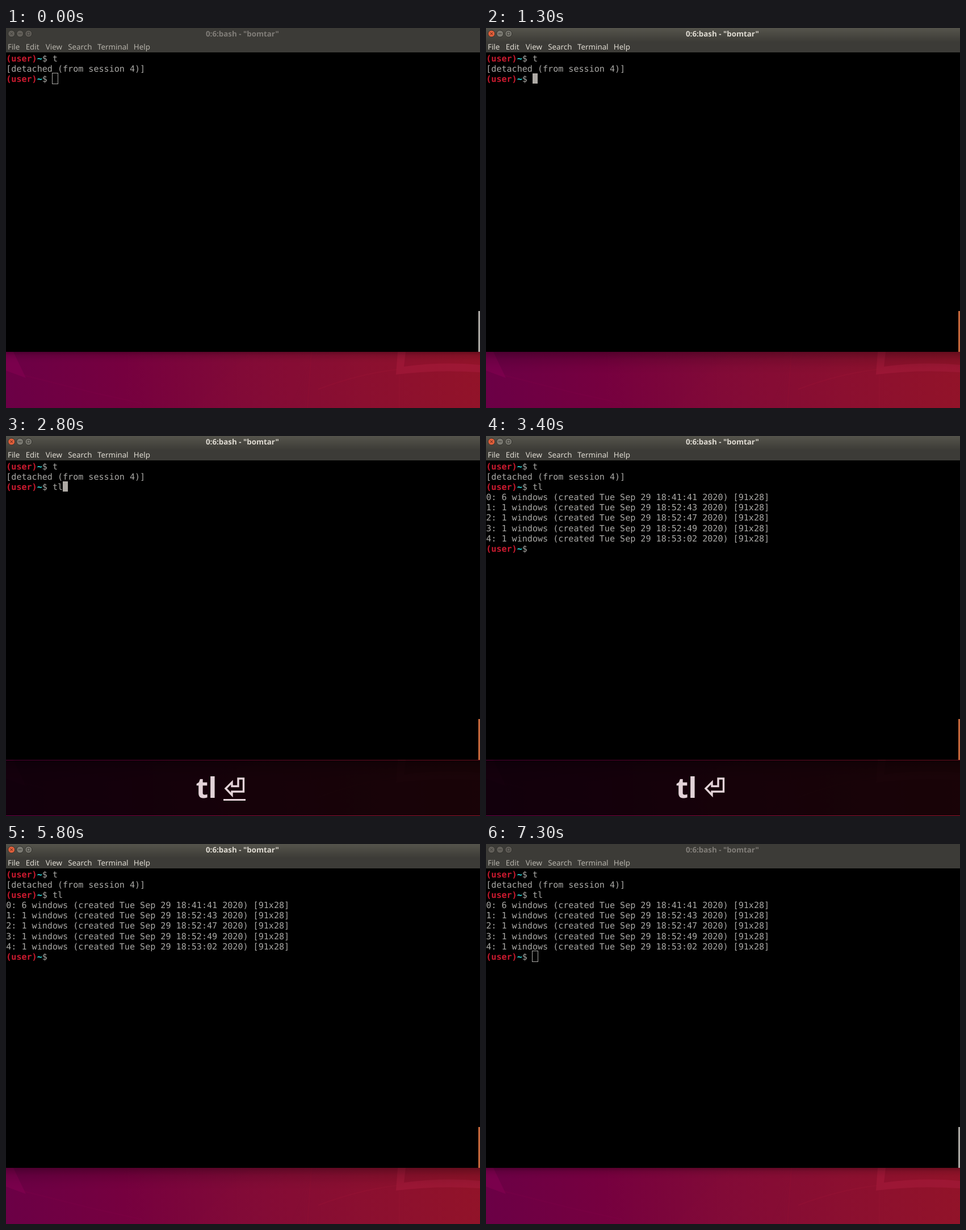
An HTML page with a canvas that plays this animation: 835x670 px, repeating every 7.4 s.

```html
<!DOCTYPE html>
<html lang="en">
<head>
<meta charset="utf-8">
<title>Terminal session</title>
<style>
html, body { margin: 0; width: 100%; height: 100%; overflow: hidden; background: #000; }
canvas { display: block; }
</style>
</head>
<body>
<canvas id="stage" width="835" height="670"></canvas>
<script>
const ctx = document.getElementById('stage').getContext('2d');
ctx.textRendering = 'geometricPrecision';
const W = 835, H = 670, DESK = 571, LOOP = 7400;
const LEFT = .25, CELL = 9.07, ROW = 18.15, BASELINE = 58.6;
const MONO = '15.1px "DejaVu Sans Mono", monospace';
const UI = '13.33px "Noto Sans", sans-serif';
const GREY = '#aaa9a6';

const MENU = [['File', 3], ['Edit', 34.7], ['View', 69.7], ['Search', 109.2], ['Terminal', 161], ['Help', 224.8]];
const SESSIONS = ['6 18:41:41', '1 18:52:43', '1 18:52:47', '1 18:52:49', '1 18:53:02'].map((s, i) => {
  const [count, time] = s.split(' ');
  return `${i}: ${count} windows (created Tue Sep 29 ${time} 2020) [91x28]`;
});
// The cursor flips at each of these times, starting visible.
const BLINKS = [900, 1300, 2300, 2800, 3400, 4300, 4700, 5200, 5800, 6500, 7000, 7300];

function rect(x, y, w, h, fill) {
  ctx.fillStyle = fill;
  ctx.fillRect(x, y, w, h);
}

function text(s, x, y, font, fill) {
  ctx.font = font;
  ctx.fillStyle = fill;
  ctx.fillText(s, x, y);
}

function gradient(x0, y0, x1, y1, ...colors) {
  const g = ctx.createLinearGradient(x0, y0, x1, y1);
  colors.forEach((c, i) => g.addColorStop(i / (colors.length - 1), c));
  return g;
}

function shape(d, fill, stroke, width = 1) {
  const path = new Path2D(d);
  if (fill) { ctx.fillStyle = fill; ctx.fill(path); }
  if (stroke) { ctx.strokeStyle = stroke; ctx.lineWidth = width; ctx.stroke(path); }
}

// Text on the character grid
function put(s, col, row, fill = GREY, bold = false) {
  [...s].forEach((c, i) => {
    if (c !== ' ') text(c, LEFT + (col + i) * CELL, Math.round(BASELINE + row * ROW), (bold ? 'bold ' : '') + MONO, fill);
  });
}

function prompt(row, command) {
  put('(user)', 0, row, '#cb1a2f', true);
  put('~', 6, row, '#34e2e2', true);
  put('$ ' + command, 7, row);
}

function wallpaper() {
  rect(0, DESK, W, H - DESK, gradient(0, 660, W, 600, '#6b0046', '#76003f', '#810a37', '#8b0f30', '#921329'));
  shape('M0 571H13L35 617L0 604Z', '#85005290');
  shape('M30 612L150 642L240 662', null, '#85004838', 2);
  shape('M330 670L430 571H545L500 670Z', '#8d0c3818');
  shape('M538 571L531 670M693 612V670', null, '#a0183828', 2);
  shape('M550 637Q620 610 690 602', null, '#a3183a38', 2);
  shape('M690 571H704L701 597Q770 588 835 594V607Q760 602 687 611Z', '#a41a3aa0');
}

function shadow(depth, strength) {
  rect(0, DESK, W, depth, gradient(0, DESK, 0, DESK + depth,
    `rgba(0,0,0,${strength})`, `rgba(0,0,0,${strength * .36})`, `rgba(0,0,0,${strength * .1})`, 'rgba(0,0,0,0)'));
}

function button(x, fill, icon, ink) {
  ctx.beginPath();
  ctx.arc(x, 10, 6, 0, 7);
  ctx.fillStyle = fill;
  ctx.fill();
  ctx.strokeStyle = '#302f2b';
  ctx.lineWidth = 1;
  ctx.stroke();
  ctx.save();
  ctx.translate(x, 10);
  shape(icon, null, ink);
  ctx.restore();
}

function chrome(focused) {
  shadow(focused ? 40 : 20, focused ? .3 : .28);
  rect(0, 0, W, 43, '#3c3b37');
  if (focused) rect(0, 0, W, 24, gradient(0, 0, 0, 24, '#55544c', '#3d3c37'));
  const plain = focused ? '#7b7a72' : '#625f59', ink = focused ? '#3a3934' : '#3c3b37';
  button(9.7, focused ? '#e2603b' : plain, 'M-2.3 -2.3L2.3 2.3M2.3 -2.3L-2.3 2.3', focused ? '#5c2417' : ink);
  button(24.7, plain, 'M-3 0H3', ink);
  button(39.7, plain, 'M-2.3 -2.3H2.3V2.3H-2.3Z', ink);
  text('0:6:bash - "bomtar"', 352, 15, 'bold ' + UI, focused ? '#dfdbd2' : '#807d78');
  for (const [label, x] of MENU) text(label, x, 38, UI, focused ? '#dfdbd2' : '#b5b2aa');
  rect(832, 499, 3, 72, focused ? '#c5673b' : '#a9a7a2');
}

function keyOverlay(t) {
  const ink = '#e3d3d8', font = 'bold 50px "Noto Sans", sans-serif';
  const underline = (x, w) => rect(x, 640, w, 3, ink);
  rect(0, 572, W, 97, 'rgba(0,0,0,.83)');
  if (t < 1800) {
    text('t', 368, 638, font, ink);
    if (t < 1700) underline(368, 22);
  } else if (t < 2800) {
    text('tl', 360, 638, font, ink);
    if (t < 1900) underline(382, 15);
  } else {
    text('tl', 334.5, 638, font, ink);
    shape('M387 621.5L398 610.5V617.5H409V604H418.5V627H398V633Z', null, ink, 3.4);
    if (t < 3200) underline(383, 39);
  }
}

function draw(t) {
  const focus = t < 300 || t >= 7300 ? 0 : t < 400 ? .5 : 1;
  const listed = t >= 3000;
  const command = t < 1500 ? '' : t < 1700 ? 't' : 'tl';

  wallpaper();
  if (focus < 1) chrome(false);
  ctx.globalAlpha = focus;
  if (focus) chrome(true);
  ctx.globalAlpha = 1;

  rect(0, 43, 832, DESK - 43, '#000');
  rect(832, 43, 3, 456, '#000');
  prompt(0, 't');
  put('[detached (from session 4)]', 0, 1);
  prompt(2, command);
  if (listed) {
    SESSIONS.forEach((line, i) => put(line, 0, 3 + i));
    prompt(8, '');
  }

  const x = Math.round(LEFT + (listed ? 9 : 9 + command.length) * CELL);
  const y = listed ? 189 : 80;
  if (!focus) {
    ctx.strokeStyle = GREY;
    ctx.lineWidth = 1;
    ctx.strokeRect(x - .5, y - .5, 10, 19);
  } else if (BLINKS.filter(b => b <= t).length % 2 === 0) {
    rect(x, y, 9, 18, '#aeaaa5');
  }

  if (t >= 1500 && t < 4300) keyOverlay(t);
}

const start = performance.now();
function tick() {
  draw((performance.now() - start) % LOOP);
  requestAnimationFrame(tick);
}
tick();
</script>
</body>
</html>
```
